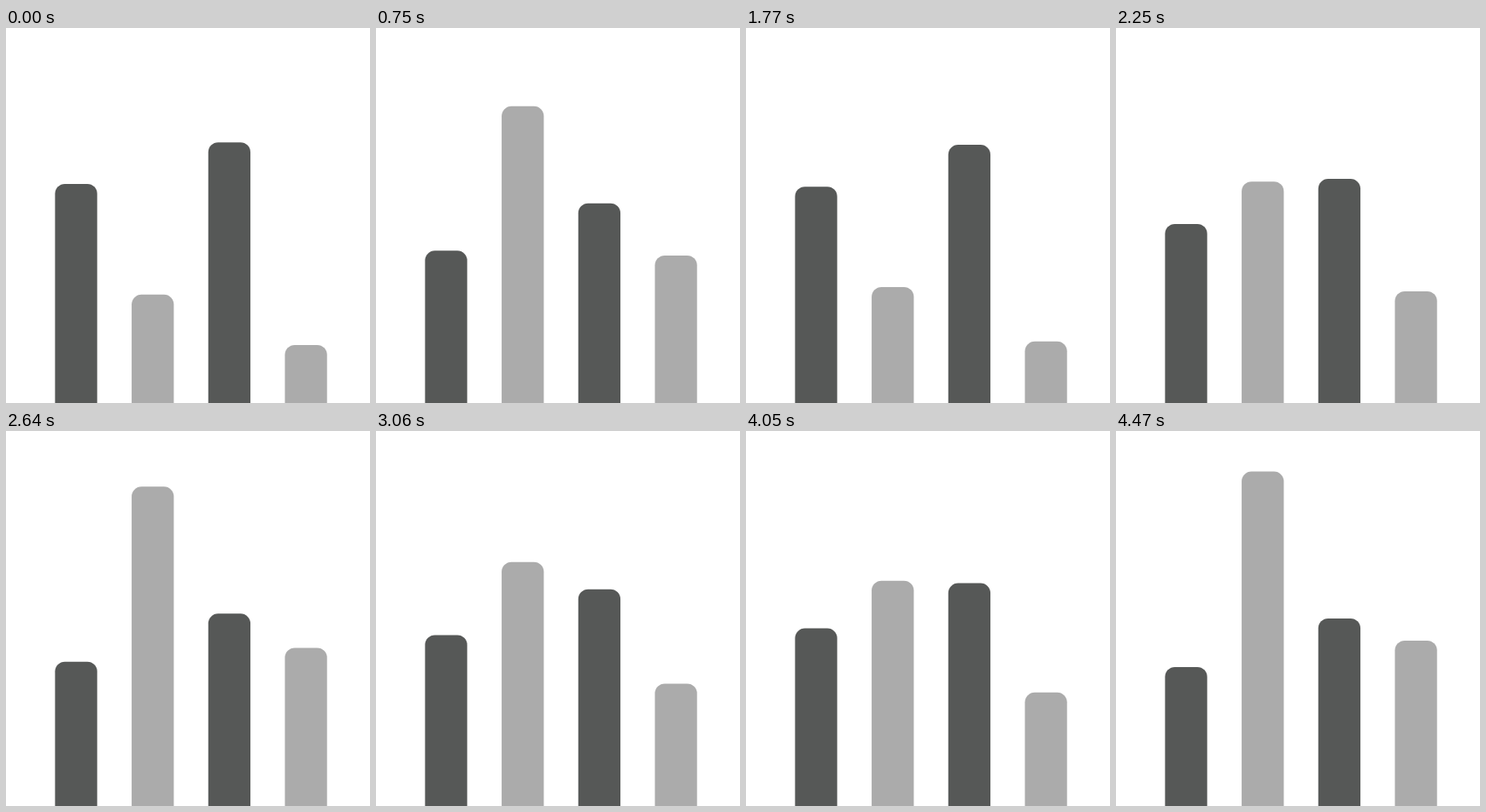
Animation, 426 px wide and 440 px high, one loop 4.5 s. Source, as an HTML page:

```html
<!DOCTYPE html>
<html lang="en">
<head>
<meta charset="utf-8">
<title>Bars</title>
<style>
  html, body { margin: 0; width: 100%; height: 100%; overflow: hidden; background: #fff; }
  svg { display: block; width: 100%; height: 100%; }
</style>
</head>
<body>
<svg viewBox="0 0 426 440"></svg>
<script>
const svg = document.querySelector('svg');
const STEP = 30, FRAMES = 150, SWEEP = 30;
const DARK = '#565857', LIGHT = '#ababab';

const bars = [
  { low: 183, high: 277, fill: DARK },
  { low: 312.8, high: 47.6, fill: LIGHT },
  { low: 134.2, high: 220, fill: DARK },
  { low: 372, high: 246, fill: LIGHT },
].map((bar, i) => {
  const rect = document.createElementNS('http://www.w3.org/2000/svg', 'rect');
  const attrs = { x: 57.4 + i * 89.67, width: 49.3, height: 500, rx: 11.5, fill: bar.fill };
  for (const name in attrs) rect.setAttribute(name, attrs[name]);
  svg.append(rect);
  return { ...bar, rect };
});

// Linear back-and-forth sweeps; the last one is a step shorter, then the loop cuts.
function progress(frame) {
  const sweep = Math.floor(frame / SWEEP);
  const length = sweep === 4 ? SWEEP - 1 : SWEEP;
  const p = (frame % SWEEP) / length;
  return sweep % 2 ? 1 - p : p;
}

function draw(time) {
  const p = progress(Math.floor(time / STEP + 0.1) % FRAMES);
  for (const { rect, low, high } of bars) rect.setAttribute('y', low + (high - low) * p);
}

function tick() {
  draw(performance.now() - start);
  requestAnimationFrame(tick);
}

const start = performance.now();
tick();
</script>
</body>
</html>
```
